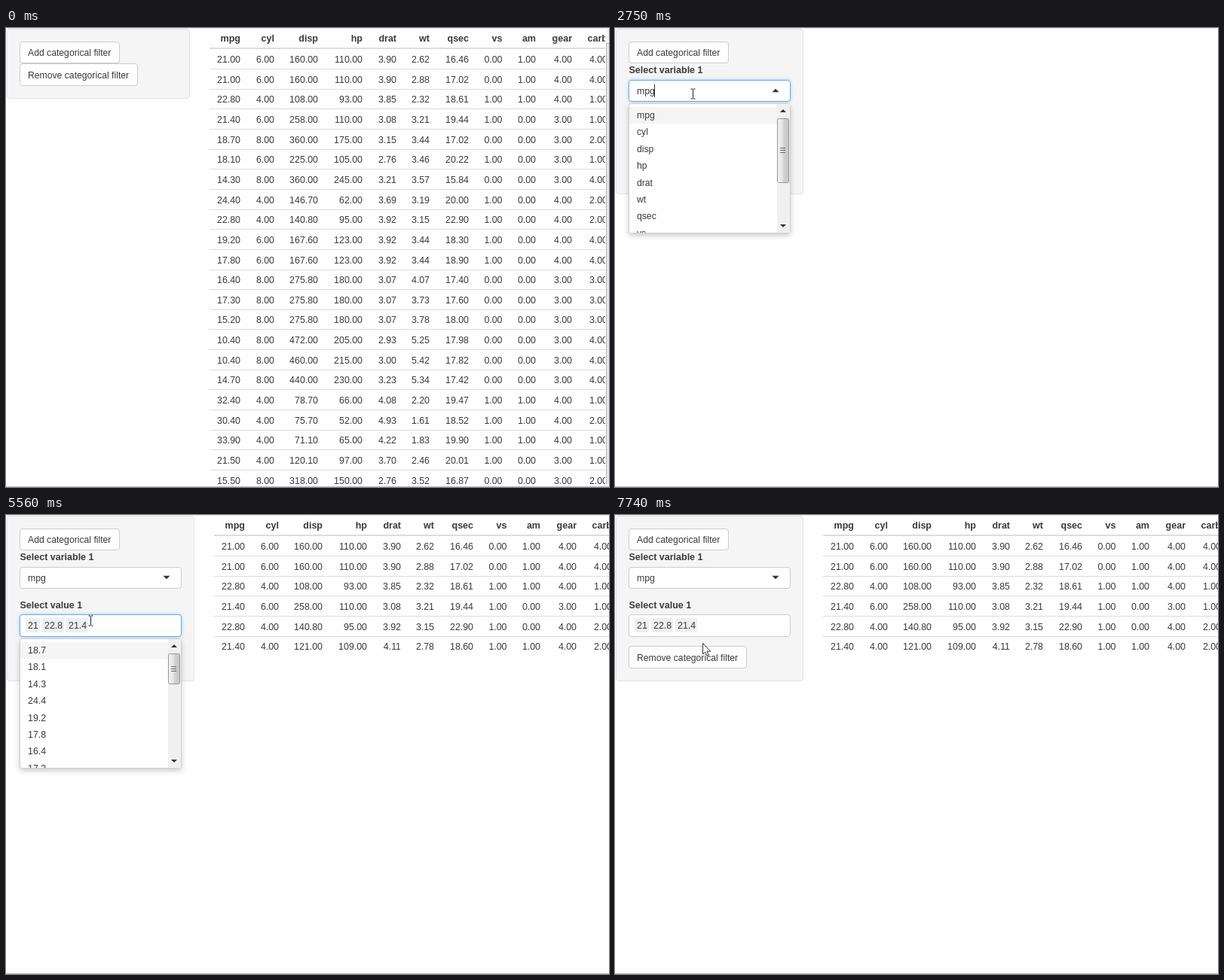
These frames come from a looping animation (800x610 px, 8 s). An HTML page:

```html
<!DOCTYPE html>
<html lang="en">
<head>
<meta charset="utf-8">
<title>Categorical filter</title>
<style>
  html, body { margin: 0; width: 100%; height: 100%; overflow: hidden; background: #fefefe; }
  #stage { display: block; }
  text { font: 12.2px "Liberation Sans", Arial, sans-serif; fill: #3a3a3a; }
  .num { font-size: 12.4px; }
  .bold { font-size: 12.5px; font-weight: bold; }
  .end { text-anchor: end; }
  .drop { filter: drop-shadow(0 3px 3.5px rgba(0, 0, 0, .2)); }
  .glow { filter: drop-shadow(0 0 2px rgba(102, 175, 233, .6)); }
</style>
</head>
<body>
<svg id="stage" width="800" height="610" viewBox="0 0 800 610">
  <defs>
    <linearGradient id="thumb">
      <stop offset="0" stop-color="#f4f4f4"/>
      <stop offset=".45" stop-color="#e4e4e4"/>
      <stop offset=".55" stop-color="#d2d2d2"/>
      <stop offset="1" stop-color="#c4c4c4"/>
    </linearGradient>
  </defs>
  <g id="scene"></g>
</svg>
<script>
const LOOP = 8000;
const ROW = 26.65, OPTION = 22.4;

const words = s => s.split(' ');
const digits = s => [...s];

// name, right edge, values
const columns = [
  ['mpg', 311, words('21 21 22.8 21.4 18.7 18.1 14.3 24.4 22.8 19.2 17.8 16.4 17.3 15.2 10.4 10.4 14.7 32.4 30.4 33.9 21.5 15.5 21.4')],
  ['cyl', 356, digits('66468684466888888444484')],
  ['disp', 414, words('160 160 108 258 360 225 360 146.7 140.8 167.6 167.6 275.8 275.8 275.8 472 460 440 78.7 75.7 71.1 120.1 318 121')],
  ['hp', 473, words('110 110 93 110 175 105 245 62 95 123 123 180 180 180 205 215 230 66 52 65 97 150 109')],
  ['drat', 518, words('3.9 3.9 3.85 3.08 3.15 2.76 3.21 3.69 3.92 3.92 3.92 3.07 3.07 3.07 2.93 3 3.23 4.08 4.93 4.22 3.7 2.76 4.11')],
  ['wt', 562, words('2.62 2.88 2.32 3.21 3.44 3.46 3.57 3.19 3.15 3.44 3.44 4.07 3.73 3.78 5.25 5.42 5.34 2.2 1.61 1.83 2.46 3.52 2.78')],
  ['qsec', 614, words('16.46 17.02 18.61 19.44 17.02 20.22 15.84 20 22.9 18.3 18.9 17.4 17.6 18 17.98 17.82 17.42 19.47 18.52 19.9 20.01 16.87 18.6')],
  ['vs', 658.5, digits('00110101111000000111101')],
  ['am', 703, digits('11100000000000000111001')],
  ['gear', 751, digits('44433334444333333444334')],
  ['carb', 798, digits('44112142244333444121122')]
];
const names = columns.map(c => c[0]);
const mpg = columns[0][2];
const levels = [...new Set(mpg)];
const picked = levels.slice(0, 3);
const allRows = mpg.map((_, i) => i);
const pickedRows = allRows.filter(i => picked.includes(mpg[i]));

const text = (x, y, s, cls = '') => `<text x="${x}" y="${y}" class="${cls}">${s}</text>`;
const rect = (x, y, w, h, fill, more = '') =>
  `<rect x="${x}" y="${y}" width="${w}" height="${h}" fill="${fill}" ${more}/>`;
// one-pixel outlined box
const box = (x, y, w, h, fill, stroke, r = 3.5, more = '') =>
  rect(x + .5, y + .5, w - 1, h - 1, fill, `stroke="${stroke}" rx="${r}" ${more}`);
const triangle = (x, y, up, w = 4.5, h = 4.5) => {
  const d = up ? -h : h;
  return `<path d="M${x - w} ${y - d / 2}h${2 * w}l${-w} ${d}z" fill="#333"/>`;
};
const caretBar = (x, y) => rect(x, y, 1, 17, '#333');

function table(rows, dx, right) {
  const rule = (y, h) => rect(270 + dx, y, right - 270 - dx, h, '#ddd');
  let s = rule(26, 2);
  columns.forEach(([name, x, values]) => {
    s += text(x + dx, 18, name, 'bold end');
    rows.forEach((r, k) => {
      s += text(x + dx, Math.round(46 + ROW * k), (+values[r]).toFixed(2), 'num end');
    });
  });
  for (let k = 0; k < rows.length - 1; k++) s += rule(Math.round(54 + ROW * k), 1);
  return `<svg width="${right}" height="609">${s}</svg>`;
}

const pageBar = () => rect(796, 1, 4, 608, '#f3f3f3') +
  rect(797, 20, 3, 586, '#e6e6e6') + rect(796, 20, 1, 586, '#b4b4b4') + rect(797, 20, 3, 1, '#b4b4b4');

function button(y, w, h, label, look) {
  const [fill, stroke] = look ? ['#e6e6e6', look === 'hover' ? '#adadad' : '#8c8c8c'] : ['#fefefe', '#ccc'];
  let s = box(18, y, w, h, fill, stroke);
  if (look === 'click') s += box(18, y, w + 1, h + 1, 'none', '#5b9bd0', 2, 'stroke-dasharray="1 1"');
  if (look === 'focus') s += box(18, y, w, h, 'none', '#555', 2, 'stroke-dasharray="1 1"');
  return s + text(29, y + h - 10, label);
}

const field = (y, h, focus) =>
  box(18, y, 215, h, '#fefefe', focus ? '#66afe9' : '#ccc', 3.5, focus ? 'class="glow"' : '');

function dropdown(y, items, active, thumb, cls) {
  let list = rect(0, 5 + OPTION * active, 196, OPTION, '#f5f5f5');
  items.slice(0, 8).forEach((item, k) => {
    list += text(10, Math.round(20 + OPTION * k), item, cls);
  });
  let s = box(18, y, 215, 173, '#fefefe', '#d0d0d0', 3, 'class="drop"');
  s += `<svg x="19" y="${y}" width="196" height="172">${list}</svg>`;
  s += rect(215, y + 1, 17, 171, '#f0f0f0');
  s += triangle(223, y + 10, true, 4, 4) + triangle(223, y + 163, false, 4, 4);
  s += box(215, y + 20, 16, thumb, 'url(#thumb)', '#979797', 2);
  for (let k = -1; k < 2; k++) s += rect(219, Math.round(y + 19 + thumb / 2) + 3 * k, 7, 1, '#666');
  return s;
}

function tags() {
  let x = 26, s = '';
  for (const v of picked) {
    const w = v.length > 2 ? 29 : 19;
    s += rect(x, 137, w, 19, '#efefef', 'rx="2"') + text(x + 3, 151, v, 'num');
    x += w + 3;
  }
  return s;
}

const shapes = {
  arrow: '<path d="M.5.5V15L3.7 12L6 17L8.3 16L6 11.2H10.7Z" fill="#fff" stroke="#333"/>',
  hand: '<path d="M-1.5 11V1.7Q0-.5 1.5 1.7V6.5Q3 5.5 4 7Q5.5 6.2 6.3 7.7Q8 7.3 8 9V13Q7.7 16 6.5 18.5H-1Q-2 15.5-4.6 11.8Q-5 9.5-3 10Z" fill="#fff" stroke="#222"/>' +
    '<path d="M1.5 6.5V10M4 7V10M6.3 7.7V10" stroke="#222" fill="none"/>',
  beam: '<path d="M-3-6.5H-.5M.5-6.5H3M0-6V6M-3 6.5H-.5M.5 6.5H3" stroke="#222" fill="none"/>',
  press: '<circle r="12" cx="-2" cy="-1" fill="none" stroke="#444"/>'
};
const cursor = (kind, x, y) => `<g transform="translate(${x} ${y})">${shapes[kind]}</g>`;

function draw(p) {
  const wide = p.form;
  let s = rect(0, 0, 800, 1, '#ececec') + rect(0, 609, 800, 1, '#bdbdbd');
  s += box(1, 1, wide ? 249 : 243, wide ? 220 : 93, '#f5f5f5', '#e3e3e3');
  s += button(18, 133, 29, 'Add categorical filter', p.look);
  s += button(wide ? 174 : 47, 157, 30, 'Remove categorical filter');
  if (!wide) s += table(allRows, 0, 795) + pageBar();
  if (p.picked) s += table(pickedRows, 6, 800);
  if (wide) {
    const first = p.open === 'names', second = p.open === 'levels';
    s += text(18.5, 60, 'Select variable 1', 'bold') + field(69, 29, first) + text(29, 88, 'mpg');
    s += triangle(213, 83, first);
    s += text(18.5, 124, 'Select value 1', 'bold') + field(132, 30, second);
    if (p.picked) s += tags();
    if (first) s += dropdown(100, names, 0, 86);
    if (second) {
      const left = p.picked ? levels.slice(3) : levels;
      s += dropdown(164, left, p.active || 0, p.picked ? 41 : 35, 'num');
    }
    if (p.caret) s += caretBar(...p.caret);
  }
  if (p.press) s += cursor('press', p.at[1], p.at[2]);
  if (p.at) s += cursor(...p.at);
  return s;
}

const beamLow = ['beam', 112.5, 140.5];
const namesOpen = { form: 1, open: 'names' };
const levelsOpen = { form: 1, open: 'levels' };
const done = { form: 1, picked: 1 };
const nameCaret = [52, 75], emptyCaret = [29, 138], tagCaret = [112, 138];

const steps = [
  [0, {}],
  [290, { at: ['beam', 300.5, 174.5] }],
  [900, { at: ['arrow', 94, 9] }],
  [1230, { look: 'hover', at: ['hand', 98, 30] }],
  [1840, { form: 1, look: 'click', at: ['hand', 97, 39] }],
  [2140, { form: 1, look: 'focus', at: ['hand', 103, 88] }],
  [2750, { ...namesOpen, caret: nameCaret, at: ['beam', 103.5, 87.5] }],
  [3060, { ...namesOpen, at: ['beam', 103.5, 87.5] }],
  [3700, { ...namesOpen, caret: nameCaret, at: ['hand', 111, 106] }],
  [3990, { form: 1, at: ['arrow', 110, 106] }],
  [4620, { ...levelsOpen, caret: emptyCaret, press: 1, at: beamLow }],
  [4940, { ...levelsOpen, caret: emptyCaret, at: beamLow }],
  [5560, { ...levelsOpen, picked: 1, at: beamLow }],
  [5880, { ...levelsOpen, picked: 1 }],
  [6480, { ...levelsOpen, picked: 1, active: 7, caret: tagCaret, at: ['arrow', 132, 447] }],
  [7420, { ...done, at: ['arrow', 132, 447] }],
  [7740, { ...done, at: ['arrow', 116, 170] }]
];

const scene = document.getElementById('scene');
let shown = null;

function render(t) {
  const step = steps.filter(([start]) => start <= t).pop();
  if (step === shown) return;
  shown = step;
  scene.innerHTML = draw(step[1]);
}

const began = performance.now();
function tick() {
  render((performance.now() - began) % LOOP);
  requestAnimationFrame(tick);
}
tick();
</script>
</body>
</html>
```
